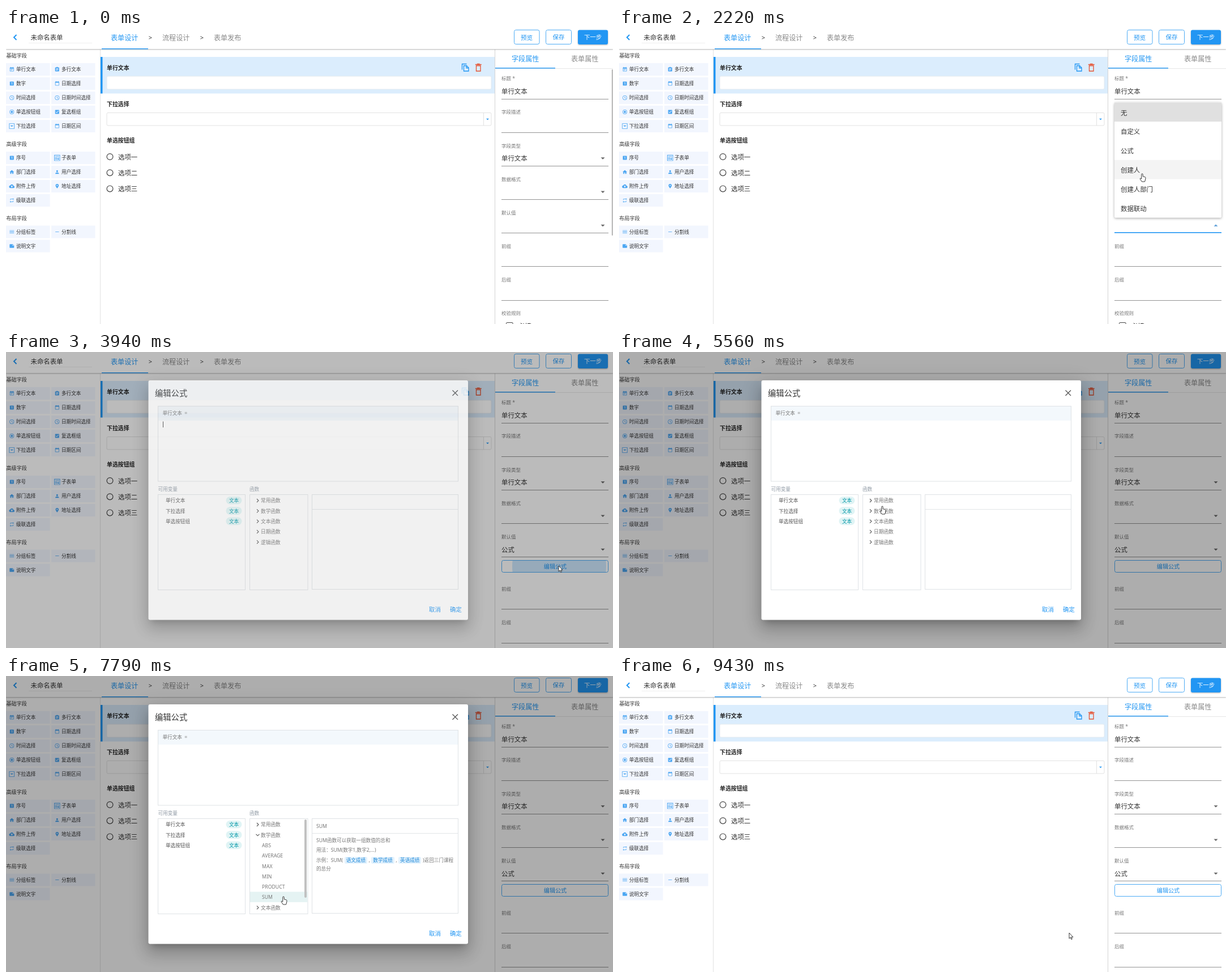
An HTML page for the animation above (9730 ms loop, 1072 px wide and 522 px high).

```html
<!DOCTYPE html>
<html>
<head>
<meta charset="utf-8">
<style>
html, body { margin: 0; width: 100%; height: 100%; overflow: hidden; background: #fff; }
svg { display: block; width: 1072px; height: 522px; }
svg, p { font-family: 'Noto Sans', 'Noto Sans CJK SC', 'Noto Sans CJK', sans-serif; }
p { margin: 0 0 2.5px; font-size: 8.6px; line-height: 15px; color: #777; }
p b { font-weight: 400; color: #1e88d8; background: #e3f2fd; border-radius: 2px; padding: 0 3px; margin: 0 2.5px; }
</style>
</head>
<body>
<svg id="stage" viewBox="0 0 1072 522"></svg>
<script>
const BLUE = '#2196f3', ICON = '#4ba6f2', EDGE = '#4dabf5', LOOP = 9730;

// --- markup helpers; text is placed by its vertical centre ---
const text = (x, y, s, size, fill = '#333', more = '') =>
  `<text x="${x}" y="${y + .38 * size}" font-size="${size}" fill="${fill}" ${more}>${s}</text>`;
const mid = (x, y, s, size, fill) => text(x, y, s, size, fill, 'text-anchor="middle"');
const rect = (x, y, w, h, fill, more = '') =>
  `<rect x="${x}" y="${y}" width="${w}" height="${h}" fill="${fill}" ${more}/>`;
const frame = (x, y, w, h, line, r = 0, fill = '#fff') => rect(x, y, w, h, fill, `stroke="${line}" rx="${r}"`);
const stroke = (d, color, width = 1, more = '') =>
  `<path d="${d}" fill="none" stroke="${color}" stroke-width="${width}" ${more}/>`;
const group = (id, body, more = '') => `<g id="${id}" ${more}>${body}</g>`;
const ring = (x, y, r, color, w) => `<circle cx="${x}" cy="${y}" r="${r}" fill="none" stroke="${color}" stroke-width="${w}"/>`;
const triangle = (x, y, w, fill, dir = 1) =>
  `<path d="M${x - w / 2} ${y - dir * w / 4}h${w}l${-w / 2} ${dir * w / 2}z" fill="${fill}"/>`;

// --- sidebar icons on a 24 unit grid ---
const box = 'M5 3h14a2 2 0 0 1 2 2v14a2 2 0 0 1-2 2H5a2 2 0 0 1-2-2V5a2 2 0 0 1 2-2z';
const calendar = box + 'M5 8v11h14V8zM6 1h2v2H6zM16 1h2v2h-2z';
const clock = 'M12 2a10 10 0 0 1 0 20a10 10 0 0 1 0-20zm0 2a8 8 0 0 0 0 16a8 8 0 0 0 0-16zM11 7h2v5l4 3-1 1.5-5-3.5z';
const icons = {
  note: calendar + 'M7 10h10v2H7zM7 14h7v2H7z',
  board: box + 'M7 7h10v2H7zM7 11h10v2H7zM7 15h7v2H7zM9 1h6v2H9z',
  one: box + 'M10 7h4v10h-2V9h-2z',
  calendar, clock,
  radio: 'M12 2a10 10 0 0 1 0 20a10 10 0 0 1 0-20zm0 2a8 8 0 0 0 0 16a8 8 0 0 0 0-16zM12 7a5 5 0 0 1 0 10a5 5 0 0 1 0-10z',
  check: box + 'M10 17l-5-5 1.4-1.4 3.6 3.6 7.6-7.6L19 8z',
  drop: 'M1 1h22v22H1zM3 3v18h18V3zM6 9h12l-6 6z',
  table: 'M0 0h24v24H0zM2 2v20h20V2zM4 5h16v2H4zM4 10h7v9H4zM6 12v5h3v-5zM13 10h7v2h-7zM13 14h7v5h-7z',
  home: 'M10 20v-6h4v6h5v-8h3L12 3 2 12h3v8z',
  user: 'M12 4a4 4 0 0 1 0 8a4 4 0 0 1 0-8zM12 14c3 0 8 1.300 8 4v2H4v-2c0-2.700 5-4 8-4z',
  cloud: 'M19.300 10A7.500 7.500 0 0 0 5.300 8A6 6 0 0 0 6 20h13a5 5 0 0 0 .3-10zM14 13v4h-4v-4H7l5-5 5 5z',
  pin: 'M12 2a7 7 0 0 0-7 7c0 5 7 13 7 13s7-8 7-13a7 7 0 0 0-7-7zm0 4.500a2.500 2.500 0 0 1 0 5a2.500 2.500 0 0 1 0-5z',
  loop: 'M7 7h10v3l4-4-4-4v3H5v6h2zM17 17H7v-3l-4 4 4 4v-3h12v-6h-2z',
  lines: 'M2 5h20v2H2zM2 11h20v2H2zM2 17h20v2H2z',
  minus: 'M4 11h16v2H4z',
  page: 'M4 4h12l6 6v8a2 2 0 0 1-2 2H4a2 2 0 0 1-2-2V6a2 2 0 0 1 2-2zM15 5.500V11h5.500z'
};
const icon = (name, x, y, s = 10) =>
  `<path transform="translate(${x - s / 2} ${y - s / 2}) scale(${s / 24})" fill="${ICON}" fill-rule="evenodd" d="${icons[name]}"/>`;

const sections = [
  [49, 73, '基础字段', 'note 单行文本 board 多行文本 one 数字 calendar 日期选择 clock 时间选择 clock 日期时间选择 radio 单选按钮组 check 复选框组 drop 下拉选择 calendar 日期区间'],
  [204.5, 229, '高级字段', 'one 序号 table 子表单 home 部门选择 user 用户选择 cloud 附件上传 pin 地址选择 loop 级联选择'],
  [335.5, 359.5, '布局字段', 'lines 分组标签 minus 分割线 page 说明文字']
];
const sidebar = sections.map(([headY, top, title, list]) => {
  const words = list.split(' ');
  let out = text(0.5, headY, title, 9.1);
  for (let i = 0; i < words.length / 2; i++) {
    const x = i % 2 * 80, y = top + (i >> 1) * 25;
    const big = /drop|table/.test(words[2 * i]);
    out += rect(x, y - 11, 77.5, 22, '#f2f6fe') + icon(words[2 * i], x + 10.3, y, big ? 10.5 : 9.5) +
      text(x + 18, y, words[2 * i + 1], 8.6);
  }
  return out;
}).join('');

const light = 'font-weight="300"', bold = 'font-weight="700"';
const header =
  rect(0, 0, 1072, 37, '#fff', 'filter="url(#soft)"') +
  stroke('M18.500 12l-4.500 4.500 4.500 4.500', BLUE, 2) +
  text(43.5, 16.5, '未命名表单', 11.4) + rect(40, 26, 112, .7, '#e8e8e8') +
  text(185, 17, '表单设计', 12.1, BLUE) + text(276, 17, '流程设计', 12.1, '#888', light) +
  text(367, 17, '表单发布', 12.1, '#888', light) +
  mid(255, 17, '&gt;', 11) + mid(346, 17, '&gt;', 11) + rect(169, 36, 82, 1.4, BLUE) +
  frame(897.5, 3.5, 44.5, 25, EDGE, 3) + mid(919.5, 16.5, '预览', 10.6, BLUE) +
  frame(953.5, 3.5, 45, 25, EDGE, 3) + mid(976, 16.5, '保存', 10.4, BLUE) +
  rect(1010, 3.5, 53, 25.5, BLUE, 'rx="3" filter="url(#soft)"') + mid(1036.5, 16.5, '下一步', 10.4, '#fff');

const canvas =
  rect(167, 51, 696.5, 64.5, '#dbedfd') + rect(167, 51, 3.5, 64.5, BLUE) +
  text(178, 70.5, '单行文本', 9.9, '#222', bold) + frame(178, 85, 679, 23, '#e3eaf0', 2) +
  stroke('M805.500 73.500V63.500h8M808.500 66.500h5l3.500 3.500v6h-8.500zM813 66.500v4h4', BLUE, 1.3) +
  stroke('M830.500 66.500h7.500v9.500h-7.500zM828.800 64.500h10.900M832.500 64v-.5h3.500v.5', '#e5512f', 1.3) +
  text(178, 134.5, '下拉选择', 9.9, '#222', bold) + frame(178, 149.5, 679, 22.5, '#e2e2e2', 2) +
  stroke('M843.500 149.500v22.500', '#e2e2e2') + triangle(850.5, 161, 5, BLUE) +
  text(178, 198.5, '单选按钮组', 9.9, '#222', bold) +
  ['一', '二', '三'].map((n, i) => ring(183.5, 227 + i * 28.2, 5.4, '#444', 1.2) +
    text(198, 227.5 + i * 28.2, '选项' + n, 11.4)).join('');

// --- property panel ---
const step = 59.15;
const label = (y, s, id = '') => text(875, y, s, 8.5, '#777', id);
const underline = y => rect(875, Math.round(y - .4), 189, 1, '#949494');
const field = (i, s, value = '', select = false, dy = 0) => {
  const y = i * step + dy;
  return label(89 + y, s) + underline(125 + y) + text(875, 111.7 + y, value, 11.4) +
    (select ? triangle(1054, 111.7 + y, 7, '#666') : '');
};
const panel =
  rect(864, 38, 208, 484, '#fff') + text(893, 54, '字段属性', 12.1, BLUE) + text(998, 54, '表单属性', 12.1, '#888', light) +
  rect(864, 71, 208, .7, '#ddd') + rect(864, 70, 106, 1.4, BLUE) +
  field(0, '标题 *', '单行文本') + field(1, '字段描述') + field(2, '字段类型', '单行文本', true) + field(3, '数据格式', '', true) +
  label(325.5, '默认值', 'id="defLabel"') + rect(875, 361, 189, 1, '#949494', 'id="defLine"') +
  group('arrowDown', triangle(1054, 348.5, 7, '#666')) + group('arrowUp', triangle(1054, 348, 7, '#5c9fd8', -1)) +
  group('clear', stroke('M1031 345l7 7M1038 345l-7 7', '#555', 1.1)) +
  group('plain', field(5, '前缀') + field(6, '后缀') + label(503, '校验规则') +
    frame(883.5, 519.5, 11.5, 11.5, '#444', 1) + text(905, 525.5, '必填', 11.4)) +
  group('formula', text(875, 348.5, '公式', 11.4) + field(5, '前缀', '', false, 33) + field(6, '后缀', '', false, 33) +
    frame(875.5, 367.5, 188, 21, EDGE, 3) +
    `<circle id="ripple" cx="977" cy="378" fill="${BLUE}" clip-path="url(#button)"/>` +
    mid(970, 378.5, '编辑公式', 10.1, BLUE)) +
  rect(1069.7, 73, 2.3, 293, '#bdbdbd', 'id="thumb" rx="1"');

const rowH = 33.8;
const menu = rect(875, 131.3, 189, 203, '#fff', 'rx="2" filter="url(#raise)"') +
  rect(875, 131.3, 189, rowH, '#e0e0e0') + rect(875, 0, 189, rowH, '#f4f4f4', 'id="menuHover"') +
  ['无', '自定义', '公式', '创建人', '创建人部门', '数据联动'].map((s, i) => text(886, 149.3 + i * rowH, s, 11.4)).join('');

// --- dialog ---
const treeH = 18.3, treeY = 262, leafTop = 289;
const chips = s => s.split(' ').map(c => `<b>${c}</b>`).join(',');
const marks = chips('语文成绩 数学成绩 英语成绩');
const functions = [
  ['ABS', '一个数的绝对值', '数字', '-8', '可以返回8，也就是-8的绝对值'],
  ['AVERAGE', '一组数值的平均值', '数字1,数字2,...', marks, '返回三门课程的平均分'],
  ['MAX', '一组数值的最大值', '数字1,数字2,...', marks, '返回三门课程的最高分'],
  ['MIN', '一组数值的最小值', '数字1,数字2,...', marks, '返回三门课程的最低分'],
  ['PRODUCT', '一组数值的乘积', '数字1,数字2,...', chips('单价 数量'), '获取总价'],
  ['SUM', '一组数值的总和', '数字1,数字2,...', marks, '返回三门课程的总分']
];
const branch = (row, s, open) => {
  const y = treeY + row * treeH;
  return stroke(open ? `M441.500 ${y - 1.5}l3 3 3-3` : `M443 ${y - 3}l3 3-3 3`, '#555', 1.1) + text(450, y, s, 8.7, '#777');
};
const help = functions.map(([name, what, args, sample, result], i) => group('help' + i,
  text(548, 265, name, 8.7, '#777') +
  `<foreignObject x="548" y="282.500" width="250" height="130"><p>${name}函数可以获取${what}</p>` +
  `<p>用法：${name}(${args})</p><p>示例：${name}(${sample})${result}</p></foreignObject>`)).join('');
// one layer of an elevation shadow behind the dialog
const layer = (dy, blur, spread, alpha) => rect(251.5 - spread, 50 - spread + dy, 564.5 + 2 * spread, 422.5 + 2 * spread,
  '#000', `rx="3" opacity="${alpha}" style="filter:blur(${blur}px)"`);
const dialog =
  layer(6.5, 16, 6, .12) + layer(17, 13.5, 2, .14) + layer(8, 5.4, -5, .2) +
  rect(251.5, 50, 564.5, 422.5, '#fff', 'rx="3"') +
  text(263, 72.5, '编辑公式', 14.3) + stroke('M788.500 67.500l9.500 9.500M798 67.500l-9.500 9.500', '#555', 1.3) +
  frame(268.5, 95.5, 530, 132.5, '#dfe3e6') + rect(269, 96, 529, 25, '#f3f8fc') +
  text(276.5, 108, '单行文本&#160; =', 8.6, '#777') + rect(277, 122.5, .9, 10.5, '#333', 'id="caret"') +
  text(268.5, 242, '可用变量', 8.6, '#909aa5') + text(430, 242, '函数', 8.6, '#909aa5') +
  frame(268.5, 251.5, 154, 168, '#dfe3e6') + frame(430.5, 251.5, 102.5, 168, '#dfe3e6') +
  frame(540.5, 251.5, 258, 167, '#dfe3e6') + rect(540.5, 277, 258, .9, '#dfe3e6') +
  ['单行文本', '下拉选择', '单选按钮组'].map((s, i) => text(282, treeY + i * treeH, s, 8.6, '#555') +
    rect(388.5, 255 + i * treeH, 28, 13.6, '#e0f4f5', 'rx="6.800"') +
    mid(402.5, treeY + i * treeH, '文本', 8.6, '#0097a7')).join('') +
  branch(0, '常用函数') +
  group('closedTree', ['数学', '文本', '日期', '逻辑'].map((s, i) => branch(i + 1, s + '函数')).join('')) +
  group('openTree', rect(431, 0, 101.5, treeH, '#e5f3f3', 'id="leafHover"') + branch(1, '数学函数', true) +
    functions.map((f, i) => text(452, treeY + (i + 2) * treeH, f[0], 8.7, '#777')).join('') +
    branch(8, '文本函数') + rect(527, 253, 4, 138, '#c1c1c1', 'rx="2"')) +
  help + text(747, 454, '取消', 10.4, BLUE) + text(784, 454, '确定', 10.4, BLUE);

const cursors =
  group('arrow', '<path d="M0 0v10l2.300-2 1.500 3.500 1.600-.7-1.500-3.400h3z" fill="#fff" stroke="#222" stroke-width=".9"/>') +
  group('hand', '<path d="M-1.200 1.200a1.200 1.200 0 0 1 2.400 0v3.600l3.700.9q1.300.4 1.100 1.800L5.500 11l-1 3H-.6l-3-4.400q-.7-1.300.4-1.600l2 1z" fill="#fff" stroke="#222" stroke-width=".9"/>') +
  group('beam', stroke('M-2-5q2 0 2 1 0-1 2-1M0-4v8M-2 5q2 0 2-1 0 1 2 1', '#333', 1));

const shadow = (id, dy, blur, alpha) => `<filter id="${id}" x="-20%" y="-20%" width="140%" height="150%">` +
  `<feDropShadow dx="0" dy="${dy}" stdDeviation="${blur}" flood-opacity="${alpha}"/></filter>`;
const $ = id => document.getElementById(id);
$('stage').innerHTML =
  `<defs>${shadow('soft', 1, 1.2, .3)}${shadow('raise', 1.5, 2, .35)}` +
  `<clipPath id="button">${rect(876, 368, 187, 20, '#000')}</clipPath></defs>` +
  rect(0, 0, 1072, 522, '#fff') + sidebar + stroke('M166.500 38v484', '#e2e2e2') + canvas + panel +
  stroke('M863.500 38v484', '#d4d4d4') + header +
  group('menu', menu) + rect(0, 0, 1072, 522, '#000', 'id="shade"') + group('dialog', dialog) + group('cursor', cursors);

// --- motion ---
const path = [
  [70, 1000, 530], [820, 985, 350], [1560, 985, 350], [2220, 924, 257], [2370, 911, 243], [2460, 911, 243],
  [2620, 903, 215], [2790, 903, 215], [3220, 965, 355], [3710, 976, 377], [3960, 976, 377], [4390, 494, 266],
  [4710, 494, 266], [5560, 465, 272], [5760, 465, 272], [6320, 474, 300], [6640, 474, 300], [7560, 490, 389],
  [7790, 490, 389], [8570, 795, 453]
];
const shapes = [[0, ''], [70, 'arrow'], [560, 'beam'], [1700, 'hand'], [2830, 'arrow'], [3120, 'beam'], [3420, 'hand'],
  [3840, 'arrow'], [4330, 'hand'], [7880, 'arrow'], [8460, 'hand'], [9200, 'arrow']];
const ramp = (t, from, to) => Math.min(1, Math.max(0, (t - from) / (to - from)));
const out = p => 1 - (1 - p) ** 2;

function pointer(t) {
  const i = path.findIndex(k => k[0] > t);
  if (i < 1) return path[i ? path.length - 1 : 0].slice(1);
  const [a, b] = [path[i - 1], path[i]], p = ramp(t, a[0], b[0]), e = p * p * (3 - 2 * p);
  return [a[1] + (b[1] - a[1]) * e, a[2] + (b[2] - a[2]) * e];
}
const leafAt = y => Math.floor((y - leafTop) / treeH);
const show = (id, on) => $(id).style.display = on ? '' : 'none';
const set = (id, attrs) => { for (const k in attrs) $(id).setAttribute(k, attrs[k]); };

function draw(t) {
  const [x, y] = pointer(t);
  const picked = t >= 2770, focus = t >= 1440 && t < 3790, menuOpen = t >= 1440 && !picked;
  const shape = shapes.filter(s => s[0] <= t).pop()[1];
  for (const id of ['arrow', 'hand', 'beam']) show(id, id === shape);
  set('cursor', { transform: `translate(${x} ${y})` });

  show('thumb', t < 1220);
  show('menu', menuOpen);
  const row = Math.floor((y - 131.3) / rowH);
  show('menuHover', row > 0 && row < 6);
  set('menuHover', { y: 131.3 + row * rowH });

  show('plain', !picked);
  show('formula', picked);
  show('arrowUp', menuOpen);
  show('arrowDown', !menuOpen);
  show('clear', picked && focus);
  set('defLabel', { fill: focus ? BLUE : '#777' });
  set('defLine', { fill: focus ? BLUE : '#949494', height: focus ? 1.6 : 1, y: focus ? 360 : 361 });
  set('ripple', { r: 106 * out(ramp(t, 3770, 4090)), opacity: .22 * (1 - ramp(t, 3980, 4350)) });

  const closing = 1 - ramp(t, 9190, 9290);
  set('dialog', { opacity: out(ramp(t, 3840, 4020)) * closing });
  show('dialog', t > 3840 && closing > 0);
  set('shade', { opacity: .32 * out(ramp(t, 3800, 4040)) * (1 - out(ramp(t, 9190, 9410))) });
  show('caret', t < 4370 || t > 4860 && t < 5360);

  const open = t >= 5740, leaf = leafAt(y), last = open ? leafAt(pointer(Math.min(t, 7600))[1]) : -1;
  show('closedTree', !open);
  show('openTree', open);
  show('leafHover', leaf >= 0 && leaf < 6 && x < 533);
  set('leafHover', { y: leafTop + leaf * treeH });
  functions.forEach((f, i) => show('help' + i, i === last));
}

const start = performance.now();
function tick() {
  draw((performance.now() - start) % LOOP);
  requestAnimationFrame(tick);
}
tick();
</script>
</body>
</html>
```
